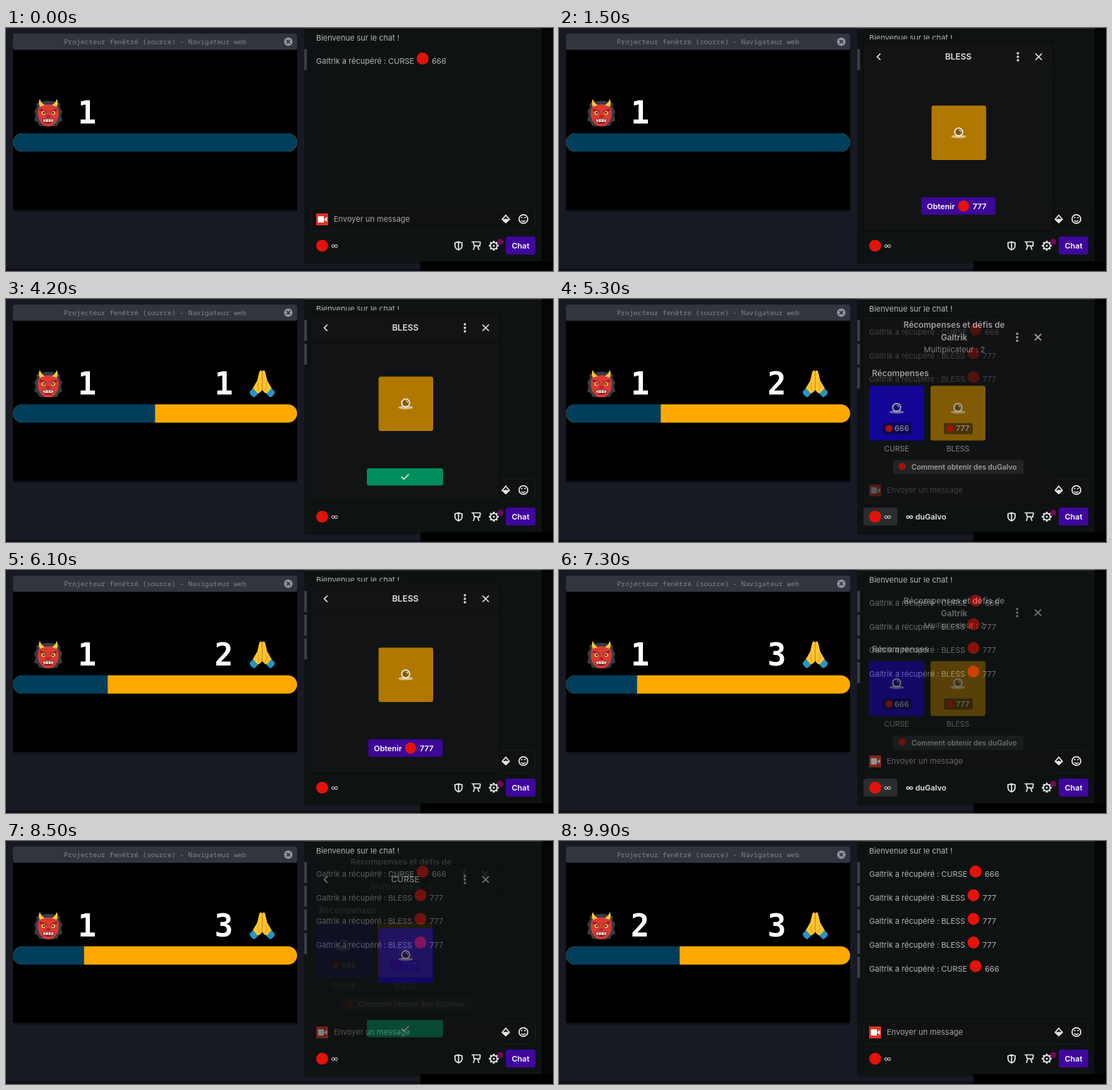
Recreate the animation shown at these times as an HTML page. Size 776 by 346 pixels, loop 10 s.

```html
<!DOCTYPE html>
<html lang="fr">
<head>
<meta charset="utf-8">
<style>
html, body { margin: 0; width: 100%; height: 100%; overflow: hidden; background: #171923; }
svg { display: block; width: 776px; height: 346px; font: 11px Inter, sans-serif; }
.b { font-weight: 600; }
.m { text-anchor: middle; }
.mono { font: 9.8px "Noto Sans Mono", monospace; }
.count { font: bold 44px "DejaVu Sans Mono", monospace; fill: #fff; }
.line { fill: none; stroke: #e4e4e6; stroke-width: 1.7; }
</style>
</head>
<body>
<svg id="stage" viewBox="0 0 776 346"></svg>
<script>
const NAME = 'Galtrik', COIN = 'duGalvo';
const CYCLES = [[950, 'BLESS'], [3050, 'BLESS'], [5160, 'BLESS'], [7210, 'CURSE']];
const LOOP = 10000, CLOSE = 1180, FADE = 200;

const rect = (x, y, w, h, fill, r = 0, extra = '') =>
  `<rect x="${x}" y="${y}" width="${w}" height="${h}" rx="${r}" fill="${fill}" ${extra}/>`;
const text = (x, y, s, fill = '#b4b5b8', cls = '', size = 11) =>
  `<text x="${x}" y="${y}" fill="${fill}" class="${cls}" style="${cls.match(/mono|count/) ? '' : `font-size:${size}px`}">${s}</text>`;
const coin = (x, y, r = 8.5) => `<circle cx="${x}" cy="${y}" r="${r}" fill="#e3120b"/>`;
const line = (d, extra = '') => `<path class="line" d="${d}" ${extra}/>`;
const group = (id, body) => `<g id="${id}" opacity="0">${body}</g>`;

const price = { CURSE: 666, BLESS: 777 };
const tint = { CURSE: '#1600cc', BLESS: '#b07800' };

function row(i, kind) {
  const y = 33.7 * i, x = kind == 'CURSE' ? 591 : 588;
  return rect(423, 30 + y, 4, 30, '#3b3d43') +
    text(440, 51 + y, `${NAME} a récupéré : ${kind}`) +
    coin(x, 43.5 + y) + text(x + 13, 51 + y, price[kind]);
}

// Crystal ball on a small base
const ball = (x, y) => `<ellipse cx="${x}" cy="${y + 5.5}" rx="10.5" ry="2.300" fill="#fff" opacity=".55"/>
  <circle cx="${x}" cy="${y - 1}" r="5.600" fill="#000" fill-opacity=".25" stroke="#f2f2f2" stroke-width="1.700"/>
  <path d="M${x} ${y - 4}q3 0 3 3" fill="none" stroke="#fff"/>`;

const menu = (x, y) => [-5, 0, 5].map(d => `<circle cx="${x}" cy="${y + d}" r="1.700" fill="#ddd"/>`).join('') +
  line(`M${x + 25} ${y - 4.5}l9 9m0-9l-9 9`);

const card = (x, kind) => rect(x, 123, 78, 78, tint[kind], 3) + ball(x + 39, 155) +
  rect(x + 19, 176, 41, 16, '#000', 3, 'opacity=".45"') + coin(x + 28, 184, 5) +
  text(x + 36, 188, price[kind], '#ddd') + text(x + 39, 216.5, kind, '#b4b5b8', 'm', 10.5);

const shell = (y, head) => rect(431.5, y, 269, 269, '#111314', 3, 'stroke="#090a0b"') +
  rect(432, head, 268, 1, '#0a0b0c');

const list = shell(24, 86) +
  text(560.5, 41, 'Récompenses et défis de', '#d8d8da', 'b m', 11.8) +
  text(560.5, 59, NAME, '#d8d8da', 'b m', 11.8) + menu(650, 54) +
  text(561, 76, 'Multiplicateur : 2', '#a8a9ac', 'm') +
  text(444, 110, 'Récompenses', '#d8d8da', 'b', 11.8) +
  card(440, 'CURSE') + card(527, 'BLESS') +
  rect(474, 229, 185, 20, '#292b2e', 3) + coin(487, 238, 5) +
  text(500, 243, `Comment obtenir des ${COIN}`, '#d8d8da', 'b', 10.2);

const detail = shell(20, 62) + line('M456 36.500l-4.500 4.500 4.500 4.500') +
  '<text id="kind" x="566.500" y="45" fill="#e0e0e2" class="b m" font-size="12"></text>' + menu(651, 41) +
  rect(528.5, 110.5, 77.5, 77.5, '#b07800', 3, 'id="tile"') + ball(567, 149) +
  `<g id="buy">${rect(514, 241, 105.5, 25, '#3d0798', 3)}${text(522, 257.5, 'Obtenir', '#fff', 'b')}
   ${coin(574, 253.5, 8)}<text id="cost" x="587" y="257.500" fill="#fff" class="b"></text></g>` +
  `<g id="done">${rect(512, 241, 108, 24.5, '#008f5c', 3)}${line('M561 253l3.500 3.500 7-7')}</g>`;

const ogre = `<g transform="translate(60 121)">
  <path d="M-12-15L-17-13-16-9-20-2-18 3-20 11-15 13-13 18-7 19H7L13 18 15 13 20 11 18 3 20-2 16-9 17-13 12-15Q0-20-12-15Z" fill="#373d43"/>
  <path d="M-13-9Q0-16 13-9 17 0 13 10 8 19 0 19T-13 10Q-17 0-13-9Z" fill="#d93a34"/>
  <path d="M-12-9Q-15-14-12-20-10-14-5-11ZM12-9Q15-14 12-20 10-14 5-11Z" fill="#f8c339"/>
  <path d="M-12-5l9 4M12-5l-9 4" stroke="#8f1f27" stroke-width="3"/>
  <g fill="#f3c65c"><circle cx="-7" cy="0" r="2.700"/><circle cx="7" cy="0" r="2.700"/></g>
  <circle cx="-6.500" r="1.300"/><circle cx="6.500" r="1.300"/>
  <path d="M-4 5Q0 1 4 5 0 8-4 5Z" fill="#a9252b"/>
  <path d="M-9 9Q0 6 9 9 8 15 0 15T-9 9Z" fill="#72161f"/>
  <path d="M-8 9.500Q0 7.500 8 9.500L6 13H-6Z" fill="#ecd9cb"/>
  <path d="M-4 9v4M0 8.500v4.500M4 9v4" stroke="#a9252b"/></g>`;

const half = `<path d="M0-18Q-3-22-4.500-16L-7-5-14 7-8 14Q-2 13 0 8Z" fill="#ffc52f"/>
  <path d="M-13 6L-18 11Q-17 17-11 19L-6 14Z" fill="#2794c2"/>
  <path d="M-5-2Q-8 5-4 10" fill="none" stroke="#eba01f" stroke-width="1.200"/>`;
const hands = `<g transform="translate(363.500 121)">${half}<g transform="scale(-1 1)">${half}</g>
  <path d="M0-17V9" stroke="#d98c16" stroke-width="1.300"/></g>`;

const gear = Array.from({ length: 8 }, (_, i) =>
  `<path d="M692 303v3" stroke="#e4e4e6" stroke-width="2.600" transform="rotate(${i * 45} 692 310)"/>`).join('');

const desktop = rect(0, 0, 776, 346, '#171923') + rect(0, 342, 588, 4, '#10111a') +
  rect(760, 0, 16, 346, '#050608') + rect(588, 332, 188, 14, '#000') +
  rect(10, 8, 403, 254, '#101219', 3) + rect(10, 8, 403, 23, '#32353e', 3) + rect(10, 31, 403, 228, '#000') +
  text(211.5, 23, 'Projecteur fenêtré (source) - Navigateur web', '#81858c', 'mono m') +
  '<circle cx="400.500" cy="19.500" r="6" fill="#92959b"/><path d="M398 17l5 5m0-5l-5 5" stroke="#292c34" stroke-width="1.500"/>';

const score = ogre + '<text id="left" x="115" y="136" class="count m"></text>' +
  group('bless', '<text id="right" x="309" y="136" class="count m"></text>' + hands) +
  '<clipPath id="pill"><rect x="10" y="150" width="403" height="26" rx="13"/></clipPath>' +
  `<g clip-path="url(#pill)">${rect(10, 150, 403, 26, '#ffa800')}${rect(10, 150, 403, 26, '#003e5c', 0, 'id="bar"')}</g>`;

const chat = rect(423, 0, 337, 332, '#0f1212') + rect(423, 332, 165, 3.5, '#0f1212') + rect(423, 0, 337, 1, '#303236') +
  text(440, 18, 'Bienvenue sur le chat !') + row(0, 'CURSE') +
  CYCLES.map(([, kind], i) => group('row' + i, row(i + 1, kind))).join('') +
  rect(432.5, 256.5, 318, 32, '#0f1112', 3, 'stroke="#191b1c"') +
  rect(440, 264, 17, 17, '#de3323', 1) + rect(442.5, 268, 8.5, 9, '#fff', 1) +
  '<path d="M451.500 272l4-3v7l-4-3Z" fill="#fff"/>' + text(465, 276, 'Envoyer un message', '#a5a6a9');

const tools = line('M709 266.500l5 6-5 4.500-5-4.500Z') + '<path d="M703.500 273l5.500-1.500 5.500 1.500-5.500 5Z" fill="#e4e4e6"/>' +
  '<circle class="line" cx="734" cy="272" r="6.200"/>' + line('M731 274q3 3 6 0') +
  '<circle cx="731.700" cy="270" r="1.100" fill="#eee"/><circle cx="736.300" cy="270" r="1.100" fill="#eee"/>';

const footer = group('hover', rect(432, 297, 48, 25.5, '#2a2c2e', 3) + text(492, 314, `∞ ${COIN}`, '#e4e4e6', 'b')) +
  coin(448.5, 310) + text(461, 314, '∞', '#d0d0d2') +
  line('M642 304.500l5 1.500v4q0 4-5 6-5-2-5-6v-4ZM642 304.500v11') +
  line('M660.500 304.500h12.500M663 304.500l1 5 8 1 1-6M665 310l-2 6m6-6l2 6') +
  gear + '<circle class="line" cx="692" cy="310" r="4.700"/><circle cx="692" cy="310" r="1.500" fill="#e4e4e6"/>' +
  '<circle cx="701.300" cy="304.500" r="4.300" fill="#720a55"/>' +
  rect(709, 297, 42, 25.5, '#3f079e', 3) + text(730, 314, 'Chat', '#fff', 'b m');

stage.innerHTML = desktop + score + chat + tools + group('list', list) + group('detail', detail) + footer;

const $ = id => document.getElementById(id);
const ramp = (t, from, span) => Math.max(0, Math.min(1, (t - from) / span));
const place = (id, alpha, dy) => {
  $(id).setAttribute('opacity', alpha);
  $(id).setAttribute('transform', `translate(0 ${dy})`);
};

function draw(t) {
  const votes = { CURSE: 1, BLESS: 0 };
  let share = 1, listAlpha = 0, listY = 0, detailAlpha = 0, detailY = 0, hover = 0;

  CYCLES.forEach(([start, kind], i) => {
    const s = t - start;
    $('row' + i).setAttribute('opacity', ramp(s, 1300, 100));
    if (s >= 1500) {
      votes[kind]++;
      const next = votes.CURSE / (votes.CURSE + votes.BLESS);
      share += (next - share) * ramp(s, 1480, 150);
    }
    if (s > -150 && s < 350) hover = 1;
    if (s < 0 || s > CLOSE + FADE) return;

    const open = ramp(s, 0, FADE), shown = 1 - ramp(s, CLOSE, FADE);
    listAlpha = s < CLOSE ? open : shown * 0.4;
    listY = 25 * (1 - open) - 7;
    detailAlpha = ramp(s, 430, 100) * shown;
    detailY = 25 * (1 - shown);
    $('kind').textContent = kind;
    $('cost').textContent = price[kind];
    $('tile').setAttribute('fill', tint[kind]);
    $('buy').setAttribute('opacity', s < 1000 ? 1 : 0);
    $('done').setAttribute('opacity', s < 1000 ? 0 : 1);
  });

  place('list', listAlpha, listY);
  place('detail', detailAlpha, detailY);
  $('hover').setAttribute('opacity', hover);
  $('left').textContent = votes.CURSE;
  $('right').textContent = votes.BLESS;
  $('bless').setAttribute('opacity', votes.BLESS ? 1 : 0);
  $('bar').setAttribute('width', 403 * share);
}

const begin = performance.now();
function tick() {
  draw((performance.now() - begin) % LOOP);
  requestAnimationFrame(tick);
}
tick();
</script>
</body>
</html>
```
